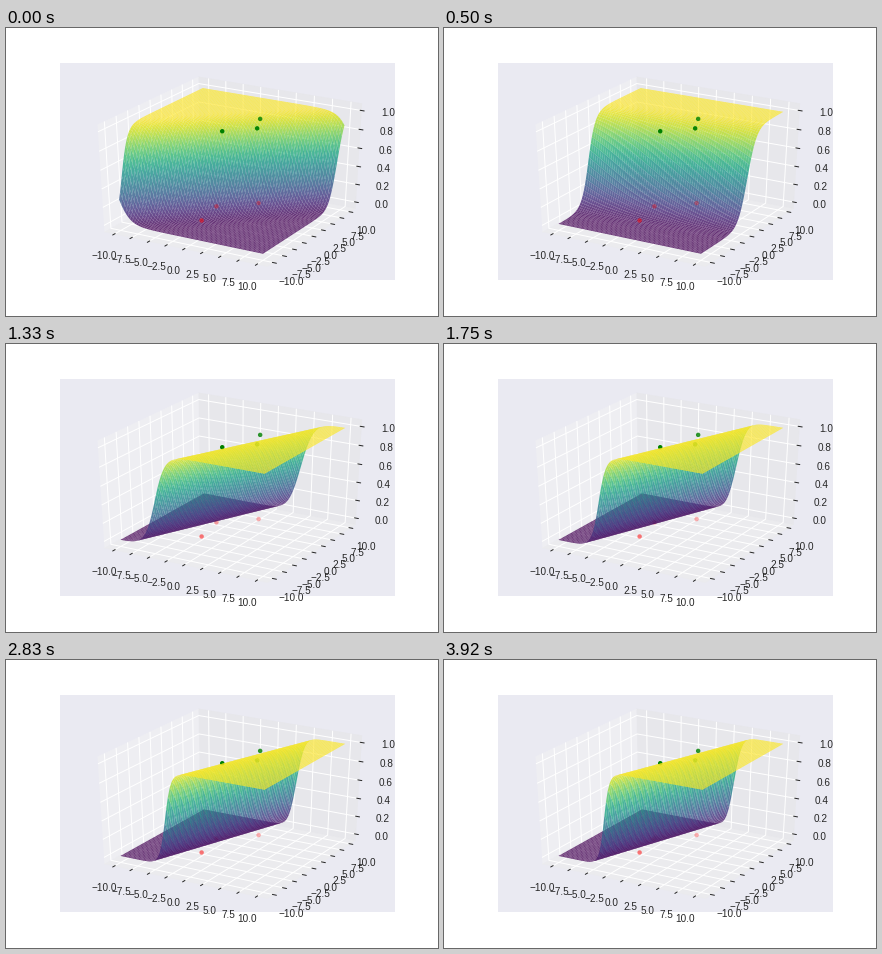
Recreate the animation shown at these times as a matplotlib script. Size 432 by 288 pixels, loop 4.01 s.

```python
import numpy as np
import matplotlib.pyplot as plt
from matplotlib.animation import FuncAnimation

FRAMES = 48
LOOP_MS = 4010
CELLS = 70

plt.style.use("seaborn-v0_8")
plt.rcParams["font.sans-serif"] = ["Liberation Sans"]

# Classifier weights: x, y, bias
START = np.array([-1.06, 1.20, 0.40])
MIDDLE = np.array([-0.03, 1.00, 0.88])
TURNED = np.array([0.95, -0.51, 0.67])
FINAL = np.array([2.30, -0.76, -0.30])
STAGE = 6    # steps per early stage
DECAY = 11   # time constant of the final convergence


def weights_at(step):
    """Two steady stages, then exponential convergence."""
    if step < STAGE:
        return START + (MIDDLE - START) * step / STAGE
    if step < 2 * STAGE:
        return MIDDLE + (TURNED - MIDDLE) * (step - STAGE) / STAGE
    return FINAL + (TURNED - FINAL) * np.exp(-(step - 2 * STAGE) / DECAY)


fig = plt.figure(figsize=(6, 4), dpi=72)
ax = fig.add_axes((0.125, 0.125, 0.775, 0.755), projection="3d")
ax.apply_aspect = lambda position=None: None  # fill the wide rectangle
ax.view_init(elev=30, azim=-60)
ax.set_proj_type("persp", focal_length=1)
ax.set_box_aspect((1, 1, 1), zoom=3 ** 0.5 / 1.8294640721620434)

# 5 % data margin, then the panes a little further out
half = 0.55 * 25 / 24
ax.set_xlim(-20 * half, 20 * half)
ax.set_ylim(-20 * half, 20 * half)
ax.set_zlim(0.5 - half, 0.5 + half)
ax.set_xticks(np.arange(-10, 10.1, 2.5))
ax.set_yticks(np.arange(-10, 10.1, 2.5))
ax.set_zticks(np.arange(6) / 5)

positive = [(1, -4, 1), (4, -1, 1), (2.5, 2.4, 1)]
negative = [(-2, -4, 0), (-3, 1.3, 0), (1, 5, 0)]
ax.scatter(*zip(*positive, *negative), c=["green"] * 3 + ["red"] * 3,
           s=20, linewidth=0)

side = np.linspace(-10, 10, CELLS + 1)
gx, gy = np.meshgrid(side, side)
surface = None


def draw(step):
    global surface
    if surface is not None:
        surface.remove()
    wx, wy, bias = weights_at(step)
    prob = 1 / (1 + np.exp(-(wx * gx + wy * gy + bias)))
    surface = ax.plot_surface(gx, gy, prob, rstride=1, cstride=1,
                              cmap="viridis", alpha=0.8, linewidth=0.4)
    return [surface]


anim = FuncAnimation(fig, draw, frames=FRAMES, interval=LOOP_MS / FRAMES,
                     repeat=True, repeat_delay=0)
plt.show()
```
